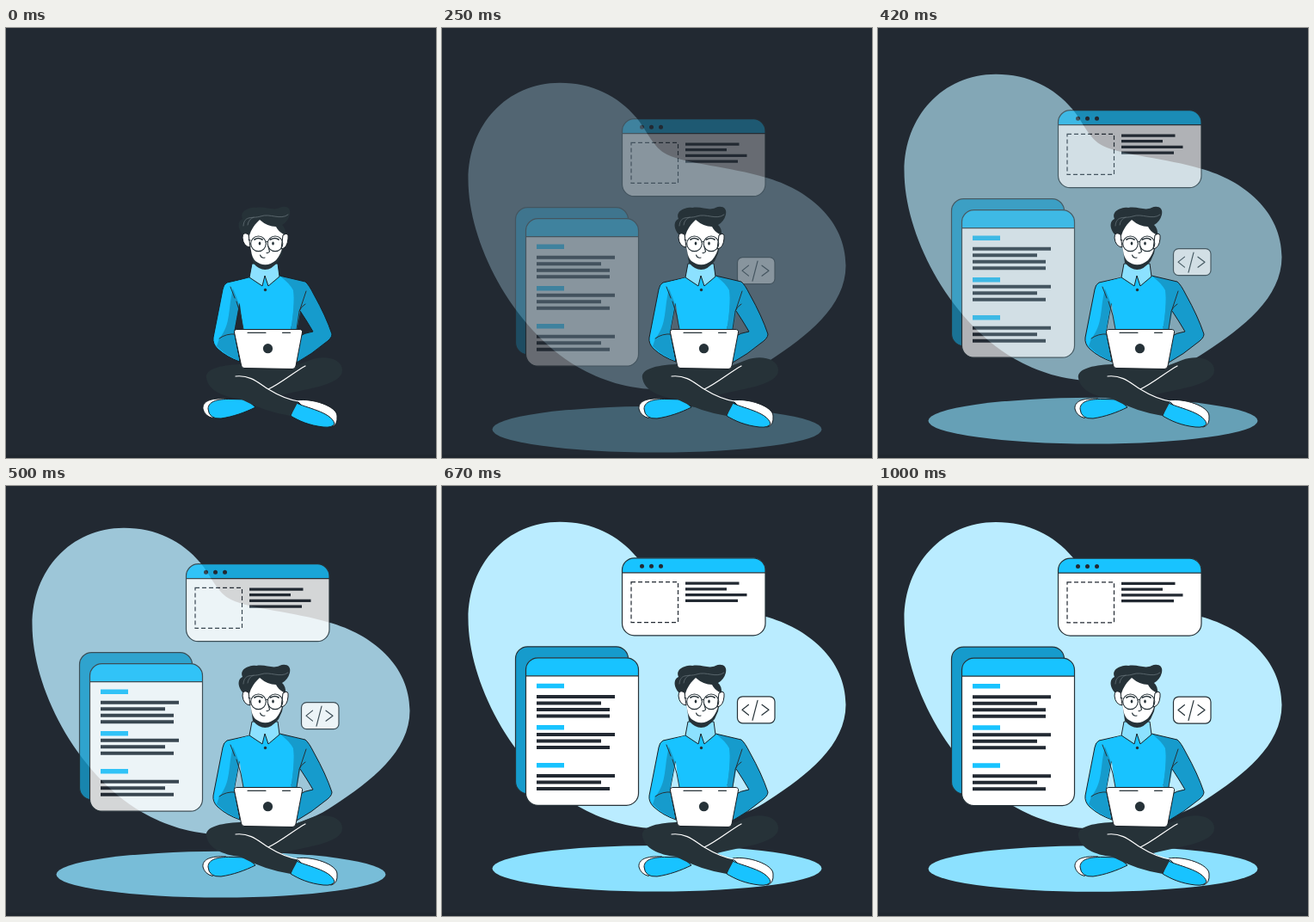
An HTML page that plays this animation: 500 px wide and 500 px high, repeating every 1.04 s.

```html
<!DOCTYPE html>
<html lang="en">
<head>
<meta charset="utf-8">
<title>Developer at work</title>
<style>
  html, body { margin: 0; width: 100%; height: 100%; overflow: hidden; background: #222932; }
  svg { display: block; width: 100%; height: 100%; }
  .line { fill: none; stroke: #263238; stroke-width: 1.2; stroke-linecap: round; stroke-linejoin: round; }
  .edge { stroke: #182026; stroke-width: 1; stroke-linejoin: round; }
  .ink { fill: #263238; }
  .blue { fill: #18c3ff; }
  .deep { fill: #169bcc; }
  .pale { fill: #8ce1ff; }
  .white { fill: #fff; }
  .text { fill: none; stroke: #222932; }
</style>
</head>
<body>
<svg viewBox="0 0 500 500">
  <path fill="#1f262e" d="M0 496H500V500H0Z"/>

  <!-- Floating scenery, in its resting place at the top of the float -->
  <path class="rise" fill="#baecff" d="M137 40.500C175 40.500 205 56 226 81C238 95 245 116 262 124C285 135 335 138 376 150.500C425 164 469.500 200 469.500 253C469.500 300 425 335 380 364C350 385 300 397 255 397C215 397 185 386 158 371C80 325 30.500 225 30.500 153C30.500 90 75 40.500 137 40.500Z"/>
  <ellipse class="rise pale" cx="250" cy="443.500" rx="191.500" ry="26.800"/>

  <g class="rise">
    <rect class="line" style="fill:#169bcc" x="85.500" y="185.500" width="131" height="171" rx="14"/>
    <rect class="white" x="97.500" y="198.500" width="131" height="171.500" rx="14"/>
    <path class="blue" d="M97.500 219.500V212.500a14 14 0 0 1 14-14h103a14 14 0 0 1 14 14v7Z"/>
    <path class="line" d="M97.500 219.500h131"/>
    <rect class="line" x="97.500" y="198.500" width="131" height="171.500" rx="14"/>
    <path fill="none" stroke="#18c3ff" stroke-width="5.500" d="M110 231.200h32m-32 48.300h32m-32 44h32"/>
    <path class="text" stroke-width="4" d="M110 243.700h91m-91 7.500h75m-75 7.500h85m-85 7.500h85M110 287.700h91m-91 7.500h75m-75 7.500h85M110 335.700h91m-91 7.500h75m-75 7.500h85"/>
  </g>

  <g class="rise">
    <rect class="white" x="209.500" y="82.500" width="166.500" height="90" rx="14"/>
    <path class="blue" d="M209.500 99.500V96.500a14 14 0 0 1 14-14h138.500a14 14 0 0 1 14 14v3Z"/>
    <path class="line" d="M209.500 99.500h166.500"/>
    <rect class="line" x="209.500" y="82.500" width="166.500" height="90" rx="14"/>
    <path class="line" style="stroke-width:5;stroke:#222932" d="M232.500 92h.01m11 0h.01m11 0h.01"/>
    <rect class="text" stroke-width="1.200" stroke-dasharray="5 3" x="220" y="110.300" width="54.500" height="47"/>
    <path class="text" stroke-width="3.300" d="M283 111.900h62.500m-62.500 6.600h48m-48 6.800h71.500m-71.500 6.700h61"/>
  </g>

  <g class="rise">
    <rect class="line" style="fill:#fff" x="343.500" y="243.500" width="43.500" height="31" rx="6"/>
    <path class="line" d="M356.500 253l-7.500 6 7.500 6M367 248l-6 23M372 253l8 6-8 6"/>
  </g>

  <!-- Legs and shoes -->
  <path class="white edge" d="M256 431C238 430 228 434 229 443Q231 451 240 453.500L258 440Z"/>
  <path class="blue edge" d="M262 431.500C244 431 235 435 235 443Q236 455 250 454C264 452 278 447 290 441L280 432Z"/>
  <path class="white edge" d="M338 433C356 430 385 440 385 451Q386 462 378 464L360 455Z"/>
  <path class="blue edge" d="M336 435C348 442 378 446 382 460Q380 465 369 464C352 462 341 457 331 451Z"/>
  <path class="ink" d="M272 391C248 392 231 397 233 407C235 421 252 429 272 431Q300 446 331 451L340 434C332 433 326 430 320 427C345 420 391 416 391 398C391 384 370 380 354 386L336 393Z"/>
  <path class="line" style="stroke:#fff" d="M267 405C285 403 295 414 305 420C318 428 328 432 340 434M348 393C335 400 320 413 305 420"/>

  <!-- Sweater, with open gaps between arms and body -->
  <path class="deep edge" d="M318 288L348 295Q352 298 358 310Q372 335 379 356Q379 361 370 367Q356 379 338 389L338 360Q348 354 357 353Q350 341 342 329L330 350Z"/>
  <path class="blue edge" d="M284 290L257 296Q253 298 252 304L241 360Q240 367 246 373Q257 383 272 388L265 354L271 322Z"/>
  <path class="deep" d="M264 303C258 325 262 345 248 361L245 370Q257 382 271 387L265 354L271 321Z"/>
  <path class="blue" d="M284 290L262 296L272 322L276 352H331C334 335 336 315 334 305Q330 297 318 288Z"/>
  <path class="deep" d="M334 303C336 315 334 335 331 352H338L343 325Z"/>
  <path class="line" style="stroke-width:1" d="M261 301L266 314M268 318Q274 334 276 350M248 361Q256 355 267 356M349 306L341 330L338 350M341 329Q343 324 348 321"/>

  <!-- Head -->
  <path class="pale edge" d="M286 274L283 290L298 300L301 288L305 300L318 289L316 274Z"/>
  <circle class="ink" cx="301.500" cy="304.500" r="1.700"/>
  <path class="ink" d="M276 241C268 232 270 224 275 222C271 213 283 208 291 209C302 207 310 213 318 209C325 206 332 209 330 217Q328 225 321 229Q326 233 325 242L321 262L317 271Q302 290 287 273L284 252Z"/>
  <path class="white" d="M295 223C287 230 284 237 282 245L285 259Q286 267 290 271Q302 280 314 270Q320 263 323 250V240Q316 236 314 231Q304 231 295 223Z"/>
  <path class="white edge" d="M282 240Q275 236 275 244Q276 254 284 255ZM322 241Q329 236 328 245Q327 256 320 257Z"/>
  <path class="line" style="stroke:#657278;stroke-width:.8" d="M276 230C277 217 287 222 296 219C307 215 319 224 328 217M281 229Q282 222 288 220"/>
  <g class="line" style="stroke-width:1.100">
    <circle cx="293.500" cy="250.800" r="8.800"/>
    <circle cx="313" cy="250.800" r="8.800"/>
    <path d="M302 249Q303.500 247.500 304.500 249M284 247L282 246M305 254L306.500 260Q305 262 303 261.500M295.500 264Q297 268 301 267"/>
    <path stroke-width="1.700" d="M289 246Q293 243 298 246M307.500 246Q313 243 317 246"/>
  </g>
  <ellipse class="ink" cx="295" cy="250.500" rx="1.300" ry="2"/>
  <ellipse class="ink" cx="310.500" cy="250.500" rx="1.300" ry="2"/>

  <!-- Laptop -->
  <path class="white edge" d="M269 350.500H341Q345 350.500 344.500 354L337 393Q336 396.500 333 396.500L277 395.500Q274 395.500 273.500 392L265.500 354Q265 350.500 269 350.500Z"/>
  <path class="line" d="M281 354.300h21m19.500 0h9"/>
  <circle class="ink" cx="304.500" cy="372.700" r="5.600"/>
</svg>
<script>
  const LOOP = 1040, START = 2.3, END = 14.3, RISE = 30, FLOAT = 2.4;
  const layers = document.querySelectorAll('.rise');

  // 24 steps a second, on a 10 ms grid
  const stepAt = ms => Math.floor((Math.floor(ms / 10) * 10 + 4.9) * 0.024);

  function draw(ms) {
    const step = stepAt(ms % LOOP);
    const shown = Math.min(1, Math.max(0, (step - START) / (END - START)));
    const lift = step > END ? Math.sin(Math.PI * (step - END) / 11) : 0;
    const y = RISE * (1 - shown) + FLOAT * (1 - lift);
    for (const layer of layers) {
      layer.setAttribute('opacity', shown);
      layer.setAttribute('transform', `translate(0 ${y})`);
    }
  }

  function tick() {
    draw(performance.now());
    requestAnimationFrame(tick);
  }
  tick();
</script>
</body>
</html>
```
